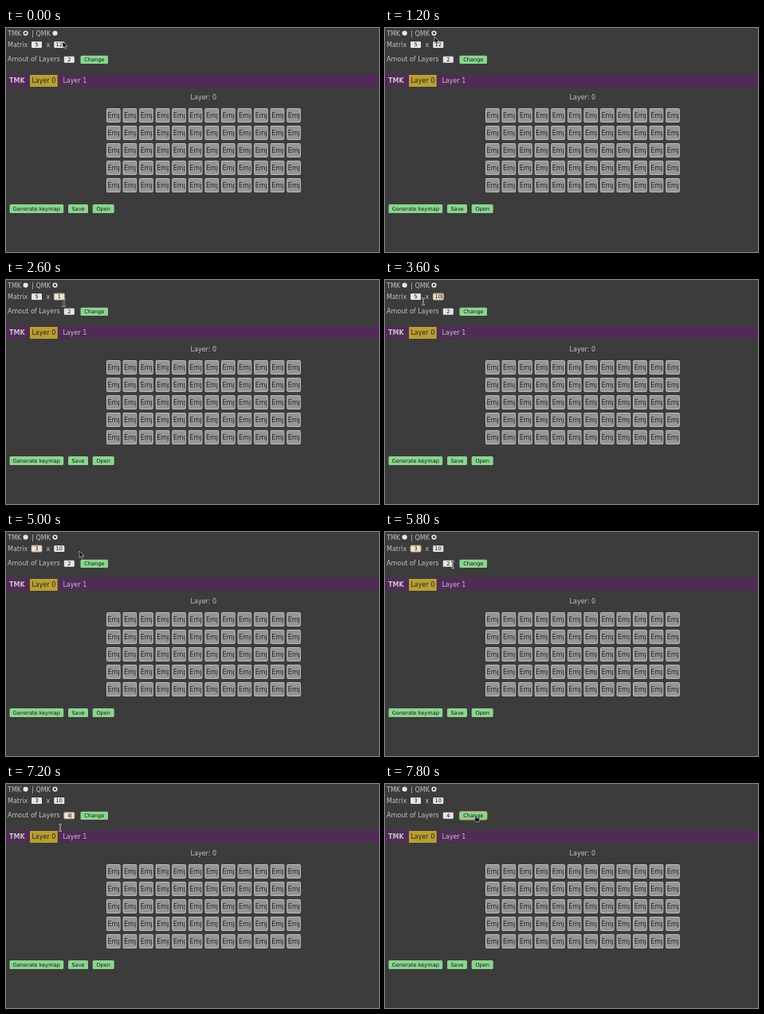
Write an HTML page that moves like this. It is 468x282 px and loops after 8000 ms.

```html
<!DOCTYPE html>
<html lang="en">
<head>
<meta charset="utf-8">
<title>Keymap editor</title>
<style>
  html, body { margin: 0; width: 100%; height: 100%; overflow: hidden; background: #3c3c3c; }
  svg { display: block; }
  text { font: 8px "DejaVu Sans", sans-serif; fill: #c2c2c2; white-space: pre; }
  .small { font-size: 6.6px; fill: #151515; text-anchor: middle; }
  .dark { fill: #262626; }
  .bold { font-weight: bold; }
  .button { fill: #8bd58f; }
  .field { fill: #e6e6e6; }
  .focus { stroke: #d39a58; stroke-width: 1; }
</style>
</head>
<body>
<svg id="stage" width="468" height="282" viewBox="0 0 468 282">
  <text x="2" y="9.6">TMK</text>
  <text x="32.2" y="9.6">| QMK</text>
  <circle cx="24.6" cy="6.5" r="3.1" fill="#e8e8e8"/>
  <circle cx="61.5" cy="6.5" r="3.1" fill="#e8e8e8"/>
  <circle id="dot" cy="6.5" r="1.4" fill="#333"/>
  <text x="2" y="23.6">Matrix</text>
  <text x="50.5" y="23.6">x</text>
  <text x="2" y="42.4">Amout of Layers</text>
  <rect y="58" width="468" height="16" fill="#502b56"/>
  <rect x="30" y="59" width="34.7" height="15" fill="#b99f31"/>
  <text class="bold" x="4" y="69">TMK</text>
  <text class="dark" x="32.4" y="69">Layer 0</text>
  <text x="71.4" y="69">Layer 1</text>
  <text x="231.6" y="89.5">Layer: 0</text>
  <g id="controls"></g>
  <g id="keys"></g>
  <g id="cursor">
    <path id="arrow" d="M0 0V8.2L2 6.4L3.5 9.3L4.8 8.6L3.4 5.9H6Z" fill="#111" stroke="#ddd" stroke-width=".6"/>
    <g id="beam" fill="none">
      <path d="M-2-4Q0-4 0-3Q0-4 2-4M0-3V3M-2 4Q0 4 0 3Q0 4 2 4" stroke="#ddd" stroke-width="1.8"/>
      <path d="M-2-4Q0-4 0-3Q0-4 2-4M0-3V3M-2 4Q0 4 0 3Q0 4 2 4" stroke="#151515" stroke-width=".8"/>
    </g>
    <path id="hand" d="M-1 0Q0-1 1 0V3L4 3.6Q5 4 4.7 5.5L4 8H0L-3 4.6Q-2.5 3.6-1 5Z" fill="#111" stroke="#ddd" stroke-width=".6"/>
  </g>
</svg>
<script>
const $ = id => document.getElementById(id);

function add(parent, tag, attrs, content = "") {
  const node = document.createElementNS("http://www.w3.org/2000/svg", tag);
  for (const name in attrs) node.setAttribute(name, attrs[name]);
  node.textContent = content;
  return parent.appendChild(node);
}

function button(x, y, width, height, label) {
  const box = add($("controls"), "rect", { x, y, width, height, rx: 1.5, class: "button" });
  add($("controls"), "text", { x: x + width / 2, y: y + height / 2 + 2.3, class: "small" }, label);
  return box;
}

function field(x, y) {
  const box = add($("controls"), "rect", { x, y, width: 13, height: 8, rx: 1, class: "field" });
  const mark = add($("controls"), "rect", { y: y + .6, height: 6.8, fill: "#3b7fc4" });
  const label = add($("controls"), "text", { x: x + 6.5, y: y + 6.4, class: "small" });
  const caret = add($("controls"), "rect", { y: y + 1, width: .6, height: 6, fill: "#222" });
  return (value, mode) => {
    const half = value.length * 2.1;
    label.textContent = value;
    label.style.fill = mode === "select" ? "#fff" : "";
    box.classList.toggle("focus", !!mode);
    mark.setAttribute("x", x + 6.5 - half);
    mark.setAttribute("width", mode === "select" ? half * 2 : 0);
    caret.setAttribute("x", x + 6.7 + half);
    caret.style.display = mode === "caret" ? "" : "none";
  };
}

const rows = field(32, 17), columns = field(60.3, 17), layers = field(72.8, 35.8);
const change = button(93.5, 34.7, 34.5, 10.3, "Change");
button(4.5, 222, 67.7, 11, "Generate keymap");
button(78, 222, 25, 11, "Save");
button(108.7, 222, 27, 11, "Open");

for (let i = 0; i < 60; i++) {
  const x = 126 + i % 12 * 20.57, y = 101 + Math.floor(i / 12) * 22;
  add($("keys"), "rect", { x: x + .5, y: y + .5, width: 16.6, height: 17, rx: .8,
    fill: "#959595", stroke: "#bcbcbc" });
  const clip = add($("keys"), "svg", { x: x + 1, y, width: 15.4, height: 17 });
  add(clip, "text", { x: .5, y: 11.8, class: "dark" }, "Empty");
}

// Start time, x, y, cursor shape
const moves = [
  [0, 71, 17, "arrow"], [200, 69, 16, "arrow"], [400, 66, 13, "arrow"],
  [600, 62, 10, "arrow"], [800, 61, 9, "arrow"], [1200, 62, 11, "arrow"],
  [1400, 64, 14, "arrow"], [1600, 70, 21, "beam"], [2000, 72, 25, "beam"],
  [2400, 72.5, 29, "beam"], [3200, 66, 29, "beam"], [3400, 55, 28, "beam"],
  [3600, 48, 27, "beam"], [3800, 44, 23, "beam"], [4200, 34, 22, "beam"],
  [4400, 27, 25, "beam"], [4800, 45, 27, "beam"], [5000, 92, 24, "arrow"],
  [5200, 96, 15, "arrow"], [5400, 101, 25, "arrow"], [5600, 97, 39, "hand"],
  [5800, 85, 41, "beam"], [6000, 89, 47, "beam"], [6600, 78, 47, "beam"],
  [6800, 50, 53, "beam"], [7000, 50, 60, "beam"], [7200, 68, 55, "beam"],
  [7400, 84, 49, "beam"], [7600, 107, 42, "hand"], [7800, 114, 39.5, "hand"]
];

function draw(t) {
  const [, x, y, shape] = moves.findLast(move => move[0] <= t);
  $("cursor").setAttribute("transform", `translate(${x} ${y})`);
  for (const name of ["arrow", "beam", "hand"])
    $(name).style.display = name === shape ? "" : "none";

  $("dot").setAttribute("cx", t < 800 ? 24.6 : 61.5);
  columns(t < 2400 ? "12" : t < 3000 ? "1" : "10",
    t < 1800 || t >= 4000 ? "" : t >= 2400 && t < 3000 ? "plain" : "caret");
  rows(t < 4600 ? "5" : "3",
    t < 4000 || t >= 6000 ? "" : t >= 4400 && t < 4600 ? "select" : "plain");
  layers(t < 7000 ? "2" : "4",
    t < 6000 || t >= 7800 ? "" : t >= 6800 && t < 7000 ? "select" : "caret");
  change.classList.toggle("focus", t >= 7800);
}

const start = performance.now();
function tick() {
  draw((performance.now() - start) % 8000);
  requestAnimationFrame(tick);
}
tick();
</script>
</body>
</html>
```
